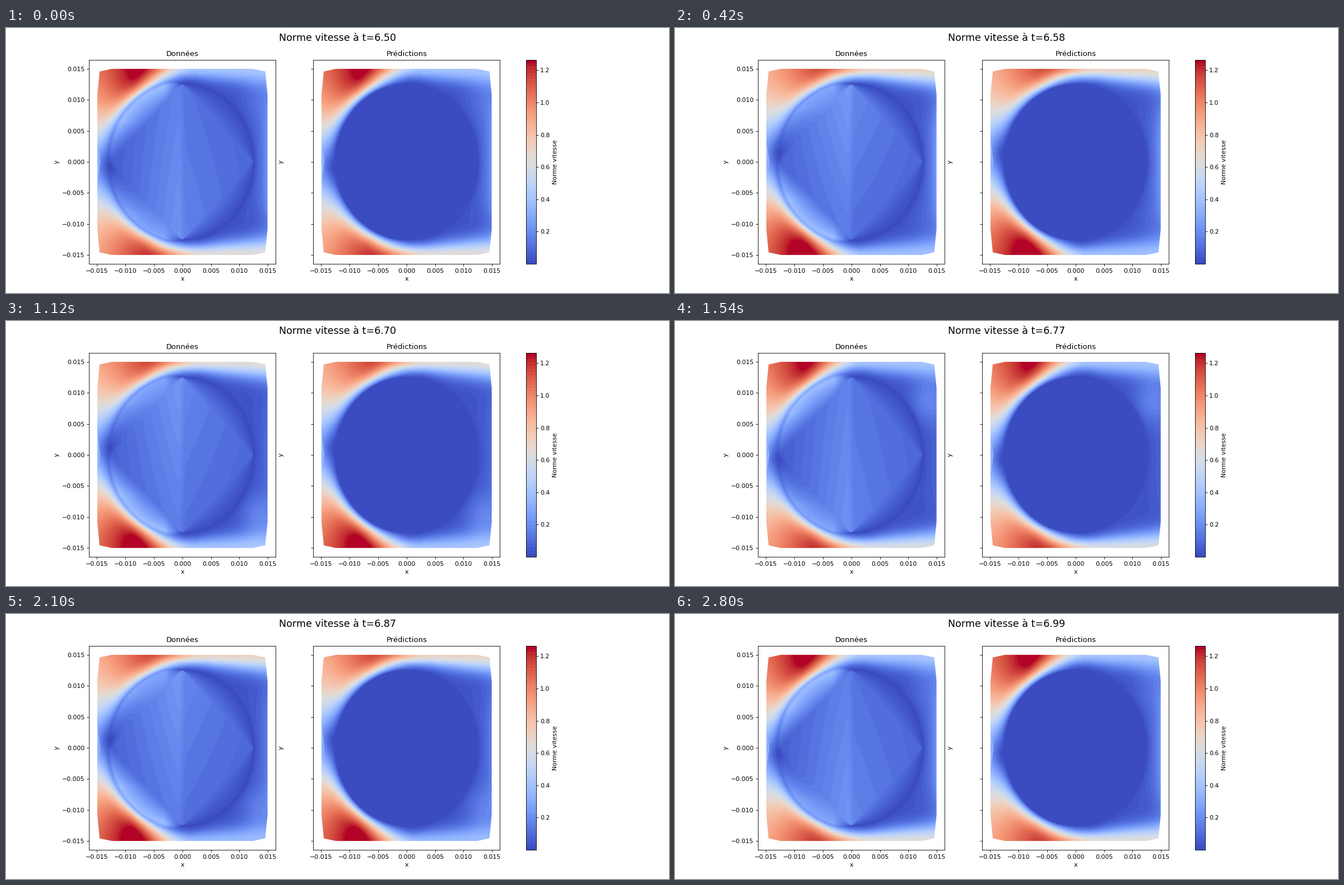
A matplotlib script for the animation above (2.94 s loop, 1183x473 px).

```python
import numpy as np
import matplotlib.pyplot as plt
from matplotlib.animation import FuncAnimation
from matplotlib.cm import ScalarMappable
from matplotlib.colors import Normalize
from matplotlib.patches import Polygon

W, H, DPI = 1183, 473, 78.85
FRAMES, STEP = 21, 140
R = 0.0125          # cylinder radius
EXT = 0.0151        # half width of the sampled square
VMAX = 1.264

# Flow state at a few instants: stagnation offset, top jet, bottom jet,
# outlet speed, recirculation height and strength.
KEYS = [0, 3, 5, 8, 11, 15, 20]
STATE = np.array([
    [-0.06, 0.38, 0.62, 0.20, 0.80, 0.06],
    [0.11, 0.68, 0.36, 0.22, -0.80, 0.03],
    [-0.12, 0.33, 0.70, 0.13, 0.80, 0.11],
    [0.09, 0.62, 0.38, 0.07, -0.80, 0.13],
    [-0.05, 0.38, 0.58, 0.05, 0.70, 0.13],
    [0.10, 0.68, 0.33, 0.13, -0.80, 0.11],
    [-0.075, 0.38, 0.61, 0.20, 0.80, 0.06],
])

X, Y = np.meshgrid(np.linspace(-EXT, EXT, 308) / R,
                   np.linspace(-EXT, EXT, 336) / R)
RAD = np.maximum(np.hypot(X, Y), 1e-6)
GAP = np.maximum(RAD - 1, 0)
Z = np.where(RAD < 1, 1, X + 1j * Y)


def smooth(a, b, x):
    u = np.clip((x - a) / (b - a), 0, 1)
    return u * u * (3 - 2 * u)


def state(k):
    i = min(np.searchsorted(KEYS, k, side="right") - 1, len(KEYS) - 2)
    u = smooth(KEYS[i], KEYS[i + 1], k)
    return STATE[i] * (1 - u) + STATE[i + 1] * u


def predicted(stag, top, bottom, outlet, eddy_y, eddy):
    # potential flow with circulation, slowed near the wall
    pot = np.abs(1 - 1 / Z**2 - 2j * np.sin(stag) / Z)
    front = 0.93 * pot * np.tanh(GAP / 0.175)

    jet = np.where(Y > 0, top, bottom)
    edge = 1.2 - np.abs(Y)
    width = 0.1 + 0.1 * np.maximum(X, 0)
    stream = jet * np.exp(-(np.maximum(edge, 0) / width) ** 2)
    wake = 0.03 + outlet * np.exp((X - 1.2) / 0.12 - (Y / 0.85) ** 4)
    wake = wake + eddy * np.exp(-((X - 1.08) / 0.25) ** 2
                                - ((Y - eddy_y) / 0.28) ** 2)
    back = (stream + wake) * np.tanh(GAP / 0.06)

    shift = 0.6 * (jet - 0.5)
    mix = smooth(-0.65, 0.25, X - shift)
    v = front * (1 - mix) + back * mix
    # flat triangles along the inlet
    wedge = X < -1.195 + 0.04 * (1 - np.abs(Y) / 0.29)
    v = np.where(wedge, np.maximum(v, 0.33 + 0.1 * np.abs(Y)), v)
    return np.maximum(v, 0.012)


def measured(pred, stag):
    # linear interpolation across the cylinder, split at x = 0
    base = 0.03 + 0.4 * abs(stag)
    left = base + (0.2 - base) * np.clip(1 + X, 0, 1)
    right = 0.145 - 0.06 * X
    ridge = smooth(-0.06, 0.05, X)
    inner = (left * (1 - ridge) + right * ridge) * (1 + 2.5 * stag * Y)

    side = np.where(Y * stag > 0, 0.75, 1)
    skin = 0.38 * side * np.clip(1.7 * np.abs(Y - stag), 0, 1)
    skin = skin * np.clip(-X / 0.25, 0, 1)
    rim = np.where(X < 0, np.maximum(skin, pred), pred)

    p = np.abs(X) + np.abs(Y)
    w = np.clip((p - 1) / np.maximum(p / RAD - 1, 1e-3), 0, 1)
    chord = inner * (1 - w) + rim * w
    outer = np.maximum(pred, skin * np.exp(-GAP / 0.15))
    return np.where(RAD < 1, chord, outer)


def fields(k):
    s = state(k)
    pred = predicted(*s)
    return measured(pred, s[0]), pred


def box(x0, x1):
    return [x0 / W, 52 / H, (x1 - x0) / W, 364 / H]


fig = plt.figure(figsize=((W + 1e-6) / DPI, (H + 1e-6) / DPI), dpi=DPI,
                 facecolor="white")
cmap = plt.get_cmap("coolwarm", 64)
norm = Normalize(0, VMAX)
corner = [(14.95, 10.8), (14.55, 14.55), (12.4, 14.97)]
hull = (corner + [(-x, y) for x, y in corner[::-1]]
        + [(-x, -y) for x, y in corner] + [(x, -y) for x, y in corner[::-1]])

images = []
panels = [("Données", 148.2, 481.4), ("Prédictions", 548.2, 881.4)]
for (name, x0, x1), data in zip(panels, fields(0)):
    ax = fig.add_axes(box(x0, x1))
    im = ax.imshow(data, cmap=cmap, norm=norm, origin="lower", aspect="auto",
                   extent=[-EXT, EXT, -EXT, EXT], interpolation="bilinear")
    im.set_clip_path(Polygon(np.array(hull) / 1000, transform=ax.transData))
    ax.set(xlim=(-0.0164, 0.0164), ylim=(-0.0164, 0.0164),
           xlabel="x", ylabel="y", title=name)
    ticks = np.arange(-3, 4) * 0.005
    ax.set_xticks(ticks)
    ax.set_yticks(ticks)
    images.append(im)
# the second panel keeps the label spacing but shows no numbers
ax.tick_params(axis="y", labelcolor="none")

cax = fig.add_axes(box(927.5, 945.5))
fig.colorbar(ScalarMappable(norm, cmap), cax=cax, label="Norme vitesse",
             ticks=np.arange(1, 7) * 0.2)
title = fig.suptitle("", fontsize=16)


def draw(k):
    for im, data in zip(images, fields(k)):
        im.set_data(data)
    title.set_text(f"Norme vitesse à t={6.504 + 0.0245 * k:.2f}")
    return images + [title]


anim = FuncAnimation(fig, draw, frames=FRAMES, interval=STEP, repeat=True,
                     repeat_delay=0, blit=False)
plt.show()
```
